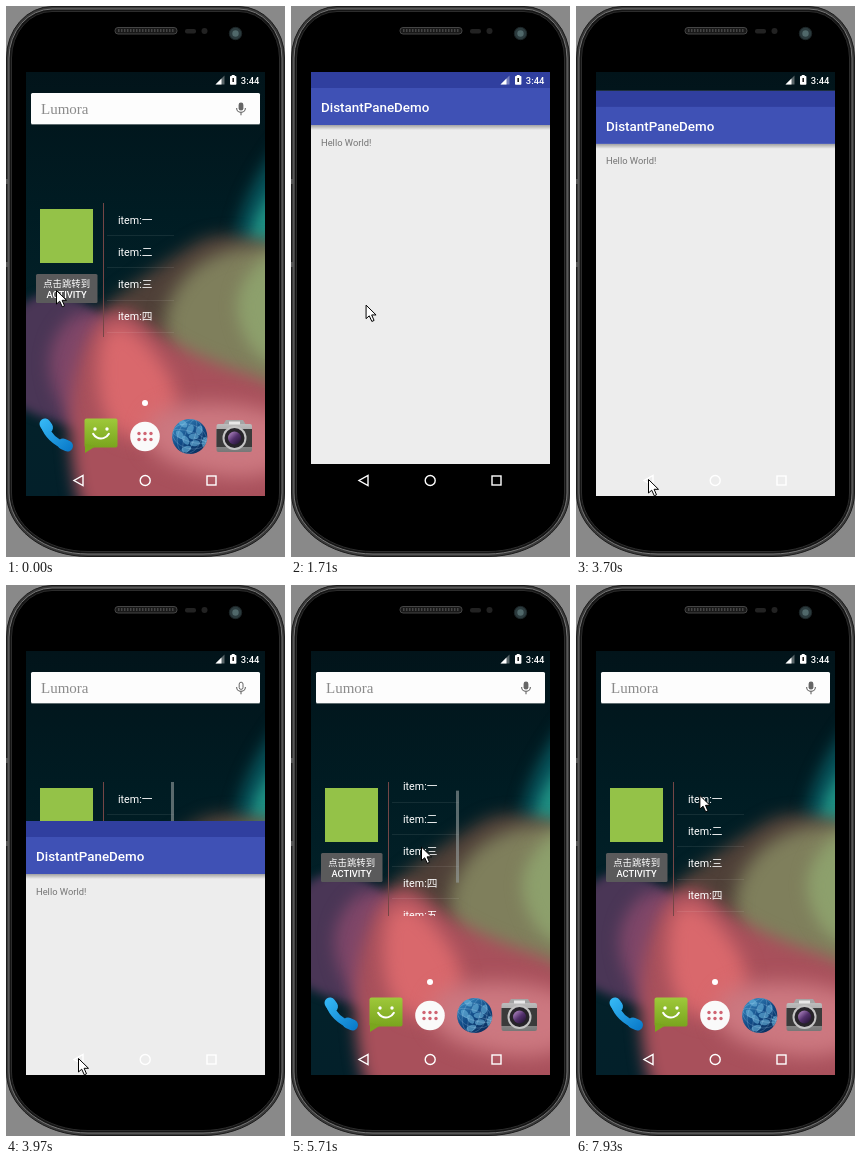
Animation of 279 by 551 pixels, one loop 8 s. Source, as an HTML page with a canvas:

```html
<!DOCTYPE html>
<html lang="zh">
<head>
<meta charset="utf-8">
<title>Home screen widget</title>
<style>
html, body { margin: 0; width: 100%; height: 100%; overflow: hidden; background: #898989; }
canvas { display: block; width: 279px; height: 551px; }
</style>
</head>
<body>
<canvas id="stage"></canvas>
<script>
const W = 279, H = 551, LOOP = 8000;
const L = 20, T = 66, SW = 239, SH = 424;
const ROW = 32.2, VIEW = 134, MAX_SCROLL = 6 * ROW - VIEW;
const SANS = 'Roboto, "Noto Sans CJK SC", "Noto Sans CJK", sans-serif';
const canvas = document.getElementById('stage');
const ratio = Math.max(1, window.devicePixelRatio || 1);
canvas.width = W * ratio;
canvas.height = H * ratio;
const ctx = canvas.getContext('2d');
ctx.scale(ratio, ratio);

function paint(c, fill, stroke, width = 1) {
  if (fill) { c.fillStyle = fill; c.fill(); }
  if (stroke) { c.strokeStyle = stroke; c.lineWidth = width; c.stroke(); }
}
function rect(c, color, x, y, w, h) {
  c.fillStyle = color;
  c.fillRect(x, y, w, h);
}
function round(c, x, y, w, h, r, ...style) {
  c.beginPath();
  c.roundRect(x, y, w, h, r);
  paint(c, ...style);
}
function disc(c, x, y, r, ...style) {
  c.beginPath();
  c.arc(x, y, r, 0, Math.PI * 2);
  paint(c, ...style);
}
function poly(c, pts, ...style) {
  c.beginPath();
  for (let i = 0; i < pts.length; i += 2) c.lineTo(pts[i], pts[i + 1]);
  c.closePath();
  paint(c, ...style);
}
function text(c, str, x, y, size, color, weight = 400, align = 'left', family = SANS) {
  c.font = `${weight} ${size}px ${family}`;
  c.textAlign = align;
  c.fillStyle = color;
  c.fillText(str, x, y);
}
function gradient(c, x0, y0, x1, y1, ...colors) {
  const g = c.createLinearGradient(x0, y0, x1, y1);
  colors.forEach((col, i) => g.addColorStop(i / (colors.length - 1), col));
  return g;
}
function layer(draw) {
  const cv = document.createElement('canvas');
  cv.width = W * ratio;
  cv.height = H * ratio;
  const c = cv.getContext('2d');
  c.scale(ratio, ratio);
  draw(c);
  return cv;
}

function shell(c, inset, fill, stroke) {
  const top = { x: 46 - inset, y: 52 - inset }, low = { x: 82 - inset, y: 64 - inset };
  round(c, inset, inset, W - 2 * inset, H - 2 * inset, [top, top, low, low], fill, stroke);
}
function drawPhone(c) {
  rect(c, '#898989', 0, 0, W, H);
  shell(c, 0.5, '#3a3a3a', '#1c1c1c');
  shell(c, 3, '#151515', '#777');
  shell(c, 5.5, '#000', '#2c2c2c');
  rect(c, '#555', 0, 173, 2, 5);
  rect(c, '#555', 0, 256, 2, 5);
  round(c, 109, 21.5, 62, 6.5, 3, '#191919', '#454545');
  for (let x = 112; x < 169; x += 3) rect(c, '#444', x, 23, 1.5, 3);
  round(c, 179, 23, 11, 4.5, 2, '#222');
  disc(c, 198.5, 25, 3, '#222');
  disc(c, 229.5, 27.5, 6.2, '#2b3a3d', '#1c2527');
  disc(c, 229.5, 27.5, 3.2, '#50686a');
}

// Soft closed curve around a few control points.
function blob(c, color, blur, ...pts) {
  const n = pts.length;
  c.filter = `blur(${blur * ratio}px)`;
  c.beginPath();
  for (let i = 0; i <= n; i += 2) {
    const x = pts[i % n], y = pts[(i + 1) % n];
    const mx = (x + pts[(i + 2) % n]) / 2, my = (y + pts[(i + 3) % n]) / 2;
    if (i) c.quadraticCurveTo(x, y, mx, my); else c.moveTo(mx, my);
  }
  paint(c, color);
  c.filter = 'none';
}
function drawWallpaper(c) {
  c.beginPath();
  c.rect(L, T, SW, SH);
  c.clip();
  rect(c, gradient(c, 0, T, 0, T + SH, '#02141a', '#001c23', '#03222a', '#03202a'), L, T, SW, SH);
  blob(c, '#07555c', 8, 310, 90, 238, 185, 222, 275, 310, 300);
  blob(c, '#1f8f82', 6, 300, 150, 250, 200, 236, 275, 300, 280);
  blob(c, '#4f4038', 8, 80, 310, 160, 255, 215, 220, 310, 255, 310, 420, 110, 410);
  blob(c, '#7f7f5c', 9, 145, 330, 190, 245, 310, 235, 310, 430, 215, 410);
  blob(c, '#8da06c', 8, 225, 280, 290, 225, 290, 370, 240, 345);
  blob(c, '#4a3656', 5, -20, 340, 35, 275, 110, 315, 150, 425, 45, 420, -20, 380);
  blob(c, '#7e4668', 8, 35, 350, 75, 295, 130, 335, 125, 445, 65, 425);
  blob(c, '#a8505b', 8, 75, 335, 112, 290, 170, 345, 310, 390, 310, 540, 80, 540, 60, 425);
  blob(c, '#d9686c', 9, 90, 325, 125, 315, 180, 390, 155, 440, 95, 425);
  blob(c, '#cc7880', 10, 140, 400, 240, 395, 310, 425, 260, 480, 140, 455);
}

function drawHandset(c) {
  c.lineCap = 'round';
  c.beginPath();
  c.moveTo(38, 419);
  c.quadraticCurveTo(43, 434, 61, 441);
  paint(c, null, gradient(c, 35, 414, 65, 446, '#35b8f5', '#0878c8'), 7);
  c.beginPath();
  c.moveTo(39, 418);
  c.lineTo(41.5, 421.5);
  c.moveTo(57, 438);
  c.lineTo(61.5, 440);
  c.lineWidth = 11;
  c.stroke();
}
function drawBubble(c) {
  round(c, 78.5, 412.5, 33, 29, 2, gradient(c, 0, 412, 0, 441, '#9fc93b', '#7aa51e'));
  poly(c, [79, 438, 90, 440, 79, 447], '#7aa51e');
  for (const x of [89, 101]) disc(c, x, 423, 1.7, '#fff');
  c.beginPath();
  c.arc(95, 423.5, 9, 0.5, Math.PI - 0.5);
  paint(c, null, '#fff', 2);
}
function drawGlobe(c) {
  const x = 183.7, y = 430.5, r = 17.6;
  c.save();
  disc(c, x, y, r, gradient(c, 170, 414, 195, 448, '#3d8fc4', '#114a86', '#0a2c5a'));
  c.clip();
  for (let i = 0; i < 9; i++) {
    const d = 4 + i * 1.5;
    c.beginPath();
    c.ellipse(x + d * Math.cos(i * 2.4), y + d * Math.sin(i * 2.4), 5, 3, i, 0, 7);
    paint(c, 'rgba(105,180,220,.6)');
  }
  for (const k of [5, 12]) {
    c.beginPath();
    c.ellipse(x, y, k, r, 0.3, 0, 7);
    c.ellipse(x, y, r, k, 0.3, 0, 7);
    paint(c, null, 'rgba(190,230,255,.3)', 0.7);
  }
  c.restore();
}
function drawCamera(c) {
  poly(c, [217, 419, 220, 414, 237, 414, 240, 419], '#a5a5a5');
  round(c, 210.5, 418, 35.5, 28, 2, gradient(c, 0, 418, 0, 446, '#bdbdbd', '#777'));
  rect(c, '#3b3b3b', 210.5, 423, 35.5, 18);
  rect(c, '#e8e8e8', 223, 415.5, 11, 3);
  disc(c, 228.5, 432, 12, '#c4c4c4');
  disc(c, 228.5, 432, 10, '#262329');
  disc(c, 228.5, 432, 6.5, gradient(c, 223, 426, 234, 438, '#b48bc6', '#53316d', '#211332'));
}
function drawDock(c) {
  disc(c, 139, 397, 3, '#fff');
  drawHandset(c);
  drawBubble(c);
  disc(c, 139, 430.5, 14.8, '#fafafa');
  for (let i = 0; i < 6; i++) disc(c, 133 + (i % 3) * 6, 427.5 + (i > 2 ? 6 : 0), 1.7, '#cf6472');
  drawGlobe(c);
  drawCamera(c);
}

const phone = layer(drawPhone);
const home = layer(c => {
  drawWallpaper(c);
  round(c, 25, 88, 229, 31, 1.5, '#5d6b6e');
  round(c, 25, 87, 229, 31, 1.5, '#fdfdfd');
  text(c, 'Lumora', 35, 108, 15, '#8b8b8b', 400, 'left', '"Liberation Serif", serif');
  rect(c, '#94c248', 34, 203, 53, 54);
  rect(c, '#744646', 97, 197, 1, 134);
  drawDock(c);
});

function drawMic(outline) {
  const c = ctx, color = '#666';
  if (outline) round(c, 233.2, 97.2, 3.8, 7.2, 1.9, null, color);
  else round(c, 232.6, 96.6, 4.8, 8, 2.4, color);
  c.beginPath();
  c.arc(235, 102, 4.4, 0, Math.PI);
  c.moveTo(235, 106.4);
  c.lineTo(235, 109.3);
  paint(c, null, color, 1.1);
}
function drawButton(pressed) {
  round(ctx, 30, 268, 61.5, 29, 1.5, pressed ? '#858585' : '#5a5a5b');
  text(ctx, '点击跳转到', 60.6, 281.3, 9.4, '#fff', 500, 'center');
  text(ctx, 'ACTIVITY', 60.6, 292, 9.3, '#fff', 500, 'center');
}
function drawList(scroll, bar) {
  const c = ctx;
  c.save();
  c.beginPath();
  c.rect(101, 197, 67, VIEW);
  c.clip();
  [...'一二三四五六'].forEach((n, i) => {
    const y = 197 + i * ROW - scroll;
    text(c, 'item:' + n, 112, y + 20.8, 10.7, '#fff');
    rect(c, 'rgba(255,255,255,.08)', 101, Math.round(y + ROW), 67, 1);
  });
  rect(c, `rgba(150,158,158,${0.6 * bar})`, 165, 197 + scroll * VIEW / (6 * ROW), 3, 92);
  c.restore();
}
function drawActivity(y, scale, navBlack) {
  const c = ctx;
  c.save();
  c.translate(L, y);
  c.scale(scale, scale);
  rect(c, '#ededed', 0, 0, SW, SH);
  rect(c, gradient(c, 0, 53, 0, 58, 'rgba(0,0,0,.32)', 'rgba(0,0,0,0)'), 0, 53, SW, 5);
  rect(c, '#303f9f', 0, 0, SW, 16.3);
  rect(c, '#3f51b5', 0, 16, SW, 37);
  text(c, 'DistantPaneDemo', 10, 39.8, 13.4, '#fff', 500);
  text(c, 'Hello World!', 10, 73.6, 9.35, '#757575');
  if (navBlack) rect(c, '#000', 0, 392, SW, 32);
  c.restore();
}
function drawBars() {
  const c = ctx;
  poly(c, [218.5, 69.5, 218.5, 78.5, 209.5, 78.5], 'rgba(255,255,255,.35)');
  poly(c, [215.5, 72.5, 215.5, 78.5, 209.5, 78.5], '#fff');
  rect(c, '#fff', 225.7, 69, 3, 1.5);
  round(c, 224, 70, 6.4, 8.8, 0.8, '#fff');
  rect(c, '#222', 226.4, 72, 1.6, 4);
  text(c, '3:44', 253.3, 77.5, 9.4, '#fff', 500, 'right');
  poly(c, [77, 469.5, 77, 479.5, 68, 474.5], null, '#fff', 1.4);
  disc(c, 139.2, 474.5, 5, null, '#fff', 1.4);
  c.strokeRect(201, 470, 9, 9);
}
function drawCursor(x, y) {
  ctx.save();
  ctx.translate(x + 0.5, y + 0.5);
  poly(ctx, [0, 0, 0, 13.5, 3.2, 10.7, 5.8, 16.3, 8, 15.3, 5.6, 9.8, 10, 9.8], '#fff', '#000');
  ctx.restore();
}

const clamp = (v, a, b) => Math.max(a, Math.min(b, v));
const mix = (a, b, p) => a + (b - a) * p;
const smooth = p => p * p * (3 - 2 * p);
const bezier = (p, a, b, c, d) =>
  mix(mix(mix(a, b, p), mix(b, c, p), p), mix(mix(b, c, p), mix(c, d, p), p), p);

// Number of discrete updates reached within [from, to].
function count(t, from, to, n) {
  if (t < from) return 0;
  return Math.min(n, 1 + Math.floor((t - from + 12) / ((to - from) / (n - 1))));
}
// Accelerating drag over five steps, then a relaxed return over three.
function swipe(k, from, to, rest) {
  return k < 5 ? mix(from, to, (k / 5) ** 1.8) : mix(to, rest, smooth((k - 5) / 3));
}

function poseAt(t) {
  const back = count(t, 1710, 2710, 8) / 8;
  const lift = smooth(count(t, 4370, 5310, 8) / 8);
  const up = count(t, 5580, 6560, 8);
  const down = count(t, 6690, 7660, 8);
  const exit = count(t, 7790, 7930, 2);
  let x = mix(bezier(back, 50, 130, 88, 72), 131, lift);
  let y = mix(bezier(back, 284, 300, 520, 473), 275, lift);
  let scroll = 0;
  if (up) {
    x -= up / 2;
    y = swipe(up, 275, 205, 260);
    scroll = up < 5 ? clamp(274 - y, 0, MAX_SCROLL) : MAX_SCROLL;
  }
  if (down) {
    x -= down * 0.45;
    y = swipe(down, 260, 320, 267) - 28.5 * exit;
    scroll = down < 5 ? clamp(314 - y, 0, MAX_SCROLL) : 0;
  }
  const shown = t < 3420 ? 0 : t < 5580 ? 1 - count(t, 4370, 5310, 8) / 2 : (8 - down) / 3;
  return { x, y, scroll, bar: clamp(shown, 0, 1) };
}

function drawScene(t) {
  const pose = poseAt(t);
  const opening = count(t, 840, 990, 2), closing = count(t, 3420, 4090, 6);
  ctx.drawImage(phone, 0, 0, W, H);
  ctx.save();
  ctx.beginPath();
  ctx.rect(L, T, SW, SH);
  ctx.clip();
  ctx.drawImage(home, 0, 0, W, H);
  drawMic(closing && t < 4370);
  drawButton(t >= 280 && t < 440);
  drawList(pose.scroll, pose.bar);
  if (opening && closing < 6) {
    const slide = 170 * (Math.max(0, closing - 2) / 3) ** 2;
    drawActivity(T + slide + (2 - opening) * 8, opening < 2 ? 0.964 : 1, closing < 3);
  }
  if (closing && closing < 3) disc(ctx, 72.5, 474.5, closing * 8, 'rgba(255,255,255,.2)');
  drawBars();
  ctx.restore();
  drawCursor(pose.x, pose.y);
}

const start = performance.now();
function frame() {
  drawScene((performance.now() - start) % LOOP);
  requestAnimationFrame(frame);
}
frame();
</script>
</body>
</html>
```
